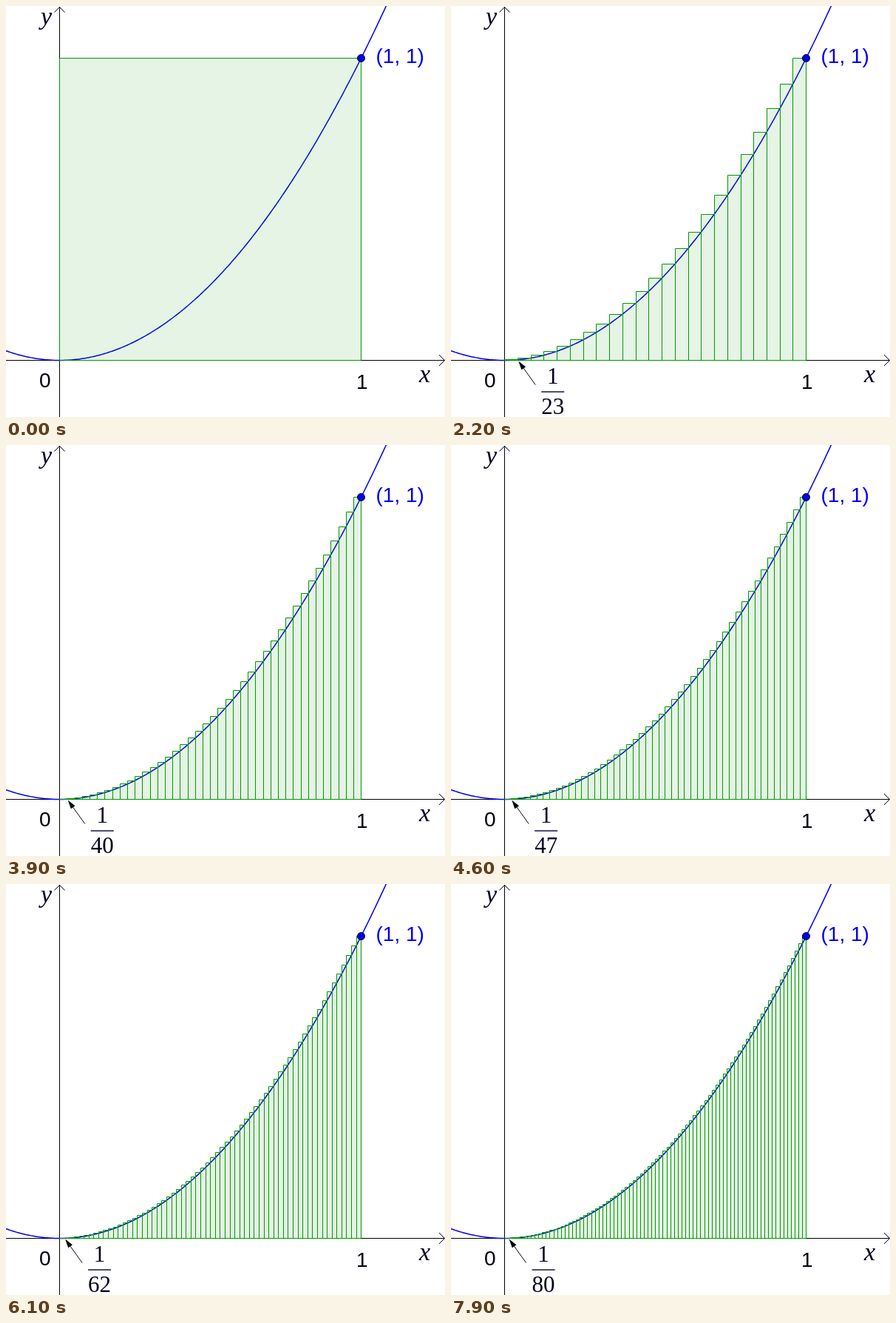
An HTML page with a canvas for the animation above (8 s loop, 594 by 555 pixels).

```html
<!DOCTYPE html>
<html lang="en">
<head>
<meta charset="utf-8">
<title>Upper sums of a parabola</title>
<style>
  html, body { margin: 0; width: 100%; height: 100%; overflow: hidden; background: #fff; }
  canvas { display: block; width: 594px; height: 555px; }
</style>
</head>
<body>
<canvas id="stage" width="594" height="555"></canvas>
<script>
const canvas = document.getElementById("stage");
const W = 594, H = 555;
const ratio = window.devicePixelRatio || 1;
canvas.width = Math.round(W * ratio);
canvas.height = Math.round(H * ratio);
const ctx = canvas.getContext("2d");
ctx.scale(ratio, ratio);

const LOOP = 8000, STEP = 100;
const X0 = 72.7, Y0 = 478.56, UNIT = 408;
const SANS = '28px "Liberation Sans", Arial, sans-serif';
const SERIF = '31px "Liberation Serif", "Times New Roman", serif';
const ITALIC = 'italic 34px "Liberation Serif", "Times New Roman", serif';
const BLUE = "#0000f0", GREEN = "#009900", INK = "#000020";

const snap = v => Math.floor(v) + 0.5;

function line(points, color, width = 1) {
  ctx.beginPath();
  for (const [x, y] of points) ctx.lineTo(x, y);
  ctx.strokeStyle = color;
  ctx.lineWidth = width;
  ctx.stroke();
}

function text(str, x, y, font, color, align = "left") {
  ctx.font = font;
  ctx.fillStyle = color;
  ctx.textAlign = align;
  ctx.fillText(str, x, y);
}

function drawAxes() {
  line([[0, 478.5], [593, 478.5]], "#000");
  line([[72.5, 1], [72.5, H]], "#000");
  line([[586, 471], [593.5, 478.5], [586, 486]], INK);
  line([[65.5, 8.5], [72.5, 1.5], [79.5, 8.5]], INK);
  text("y", 47, 25, ITALIC, INK);
  text("x", 559, 508, ITALIC, INK);
  text("0", 45, 515, SANS, "#000010");
  text("1", 474, 517, SANS, "#000010");
}

function drawCurve() {
  const points = [];
  for (let x = -2; x <= 520; x += 2) {
    const u = (x - 72.5) / UNIT;
    points.push([x, 478.5 - UNIT * u * u]);
  }
  line(points, BLUE, 1.5);
}

function drawBars(n) {
  const base = snap(Y0);
  const bars = [];
  for (let k = 1; k <= n; k++) {
    const left = snap(X0 + UNIT * (k - 1) / n);
    const right = snap(X0 + UNIT * k / n);
    const top = snap(Y0 - UNIT * (k / n) ** 2);
    bars.push([left, top, right - left, base - top]);
  }
  ctx.fillStyle = "rgba(0, 145, 0, 0.1)";
  for (const bar of bars) ctx.fillRect(...bar);
  ctx.strokeStyle = GREEN;
  ctx.lineWidth = 1;
  // one path, so shared edges are painted once
  ctx.beginPath();
  for (const bar of bars) ctx.rect(...bar);
  ctx.stroke();
}

function drawArrow(x, y) {
  const dx = 23, dy = 32, len = Math.hypot(dx, dy);
  const ux = dx / len, uy = dy / len;
  const bx = x + ux * 12, by = y + uy * 12;
  line([[bx, by], [x + dx, y + dy]], INK);
  ctx.beginPath();
  ctx.moveTo(x, y);
  ctx.lineTo(bx - uy * 3.5, by + ux * 3.5);
  ctx.lineTo(bx + uy * 3.5, by - ux * 3.5);
  ctx.fillStyle = "#000";
  ctx.fill();
}

function drawFraction(n) {
  const edge = 72.5 + UNIT / n;
  const left = edge + 32;
  const width = 15.5 * String(n).length;
  const mid = left + width / 2;
  drawArrow(edge + 1, 479.5);
  text("1", mid, 510, SERIF, INK, "center");
  text(String(n), mid, 550.5, SERIF, INK, "center");
  line([[left, 521], [left + width, 521]], "#000040", 1.4);
}

function drawPoint() {
  ctx.beginPath();
  ctx.arc(480.5, 70.5, 5, 0, Math.PI * 2);
  ctx.fillStyle = BLUE;
  ctx.fill();
  ctx.strokeStyle = "#000";
  ctx.lineWidth = 1;
  ctx.stroke();
  text("(1, 1)", 500.5, 76.5, SANS, BLUE);
}

function render(time) {
  const n = Math.floor((time % LOOP) / STEP) + 1;
  ctx.fillStyle = "#fff";
  ctx.fillRect(0, 0, W, H);
  drawAxes();
  drawCurve();
  drawBars(n);
  if (n > 1) drawFraction(n);
  drawPoint();
}

let start;
function tick(now) {
  if (start === undefined) start = now;
  render(now - start);
  requestAnimationFrame(tick);
}
render(0);
requestAnimationFrame(tick);
</script>
</body>
</html>
```
